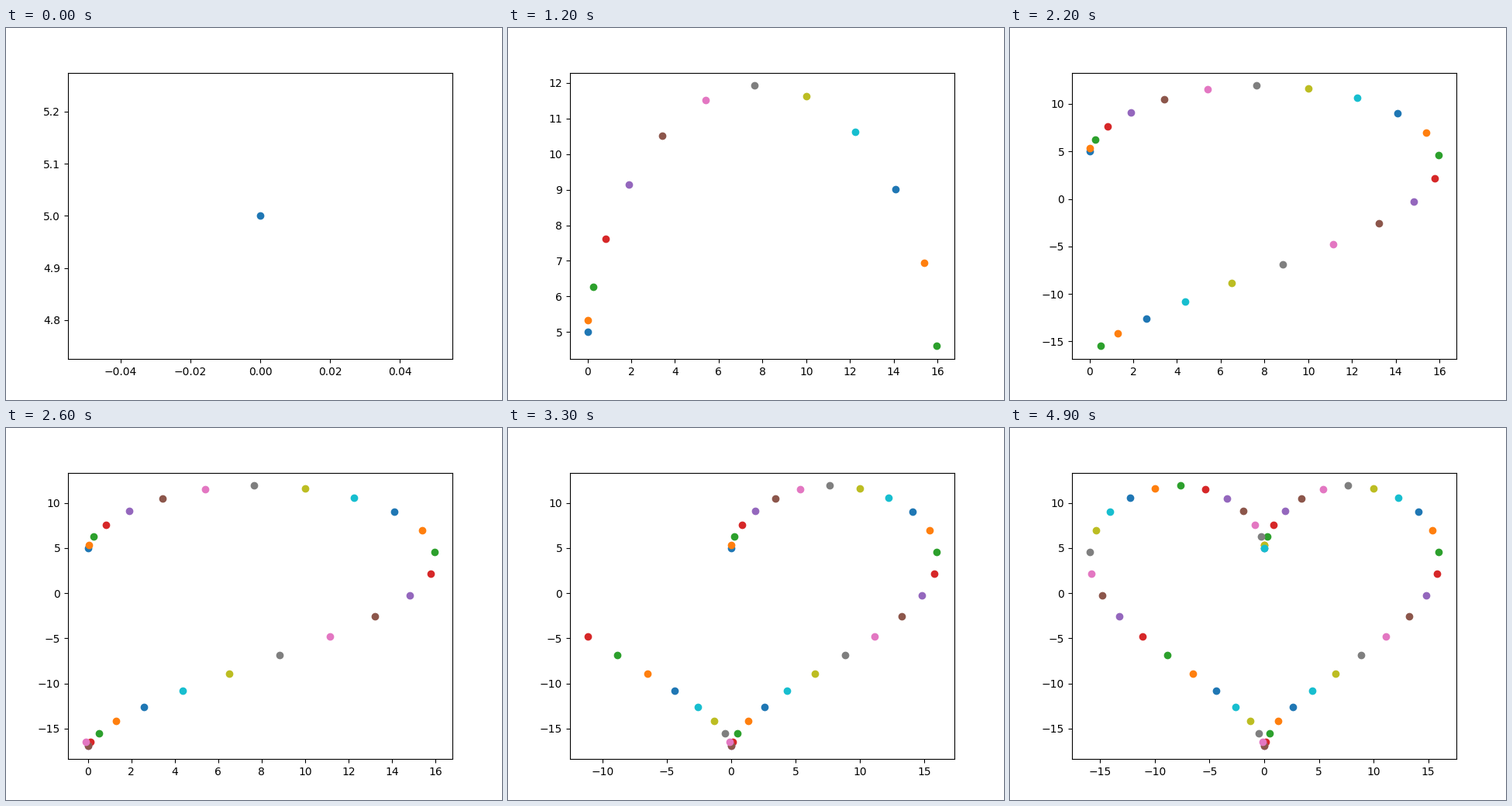
Animation of 640 by 480 pixels, one loop 5000 ms. Source, as a matplotlib script:

```python
import numpy as np
import matplotlib.pyplot as plt
from matplotlib.animation import FuncAnimation

FRAMES = 50
INTERVAL = 100  # ms

t = np.linspace(0, 2 * np.pi, FRAMES)
heart_x = 16 * np.sin(t) ** 3
heart_y = 13 * np.cos(t) - 5 * np.cos(2 * t) - 2 * np.cos(3 * t) - np.cos(4 * t)

fig, ax = plt.subplots(figsize=(6.4, 4.8), dpi=100)


def draw(frame):
    """Show the heart up to the given point; the axes rescale to fit."""
    ax.clear()
    for i in range(frame + 1):
        ax.scatter(heart_x[i], heart_y[i], color=f"C{i % 10}")
    return ax.collections


anim = FuncAnimation(fig, draw, frames=FRAMES, interval=INTERVAL,
                     init_func=lambda: draw(0), repeat=True, repeat_delay=0)
plt.show()
```
